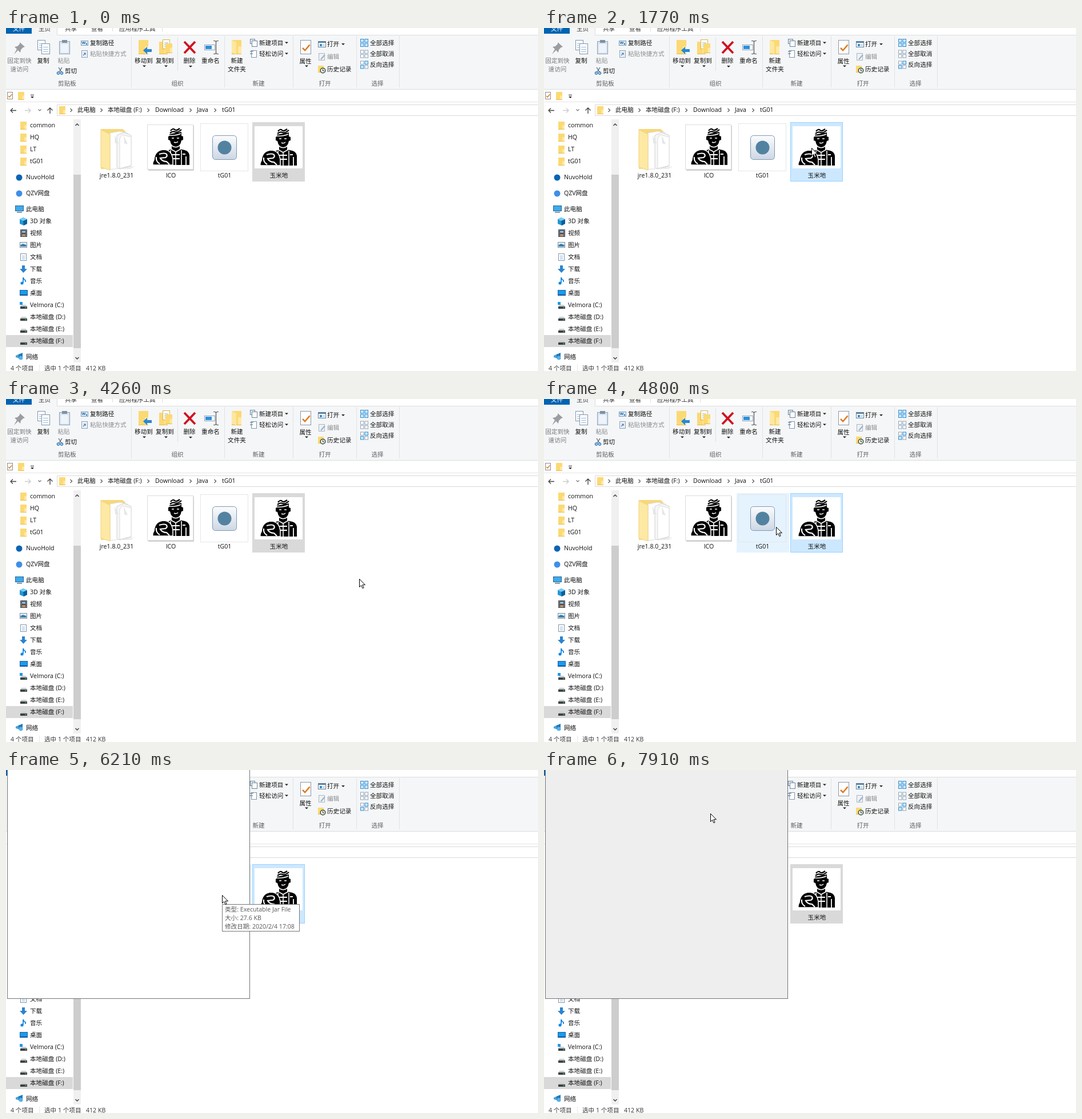
An HTML page that plays this animation: 931x601 px, repeating every 8000 ms.

```html
<!DOCTYPE html>
<html lang="zh">
<head>
<meta charset="utf-8">
<style>
html, body { margin: 0; width: 100%; height: 100%; overflow: hidden; background: #fff; }
svg { display: block; width: 100%; height: 100%; }
text { font: 10.6px "Open Sans", "Noto Sans CJK SC", "Noto Sans CJK", sans-serif; white-space: pre; }
</style>
</head>
<body>
<svg id="stage" viewBox="0 0 931 601" xmlns="http://www.w3.org/2000/svg"></svg>
<script>
const LOOP = 8000;
const GREY = '#8b8e92', LINE = '#dcddde', BLUE = '#0078d7', GOLD = '#fbd973';

// ---- shape helpers ----
const rect = (x, y, w, h, fill, more = '') =>
  `<rect x="${x}" y="${y}" width="${w}" height="${h}" fill="${fill}" ${more}/>`;
const box = (x, y, w, h, fill, edge, width = 1) =>
  rect(x + .5, y + .5, w - 1, h - 1, fill, `stroke="${edge}" stroke-width="${width}"`);
const path = (d, fill = 'none', edge = 'none', width = 1) =>
  `<path d="${d}" fill="${fill}" stroke="${edge}" stroke-width="${width}"/>`;
const dot = (x, y, r, fill, more = '') => `<circle cx="${x}" cy="${y}" r="${r}" fill="${fill}" ${more}/>`;
const text = (x, y, s, fill = '#111', more = '') =>
  `<text x="${x}" y="${y + 4}" fill="${fill}" ${more}>${s}</text>`;
const mid = (x, y, s, fill) => text(x, y, s, fill, 'text-anchor="middle"');
const group = (id, body, more = '') => `<g id="${id}" ${more}>${body}</g>`;
const at = (x, y, body) => `<g transform="translate(${x} ${y})">${body}</g>`;

// ---- small icons ----
const caret = (x, y) => path(`M${x - 3} ${y - 1.5}h6l-3 3z`, '#222');
const chevron = (x, y) => path(`M${x - 1.5} ${y - 3}l3 3l-3 3`, 'none', '#555', 1.2);
const folder = (x, y, w = 11, h = 14) =>
  rect(x, y, w, h, GOLD) + path(`M${x + w * .65} ${y + h}V${y + h * .45}H${x + w}V${y + h}z`, '#ffe9a6') +
  path(`M${x} ${y + h - .5}h${w}`, 'none', '#e8bd4c');
const page = (x, y, w, h, edge = '#8195ab') =>
  box(x, y, w, h, '#fff', edge) +
  [.35, .55, .75].map(k => path(`M${x + 3} ${y + h * k}h${w - 6}`, 'none', '#8db6dc')).join('');
const tick = (x, y, k) => path(`M${x} ${y}l${3 * k} ${3 * k}l${6 * k} ${-7 * k}`, 'none', '#e07a1f', 1.5 * k + .4);
const drive = (x, y) => path(`M${x + 2} ${y}h8l2 3h-12z`, '#c9cccf') + rect(x, y + 3, 12, 4, '#3d4145') +
  rect(x + 8, y + 4.5, 3, 1, '#56d364');
const grid = (x, y, fills) => fills.map((f, i) =>
  box(x + i % 2 * 7.5, y + (i >> 1) * 7.5, 6.5, 6.5, f ? '#cfe9fb' : '#fff', f ? '#2f8fd3' : '#8fa4b8')).join('');

const racer = path('M31 4q4-5 7-2t9-2M30 8q5-4 9-2t11-4', 'none', '#000', 2.3) +
  path('M29 10q10-2 21-4v7l3 1v6l-3 1q-2 11-10 11t-10-11l-3-1v-6l2-1z') .replace('"none"', '"#000"') +
  path('M29 12q11 1 20-3M33 17h4M42 17h4M37 24q4 2 7-1', 'none', '#fff', 1.5) +
  path('M33 31q7 5 14 0v5l9 2q7 2 8 9v17H20V47q1-7 8-9l5-2z', '#000') +
  path('M31 36l9 5l9-5M40 41v23M31 38v26M50 38v26', 'none', '#fff', 1.6) +
  path('M33 46h14M33 53h14M52 45h5M58 49v15', 'none', '#fff', 1.8) +
  path('M0 64q-1-4 2-9q1-16 16-18q15 0 17 17v10z', '#000', '#fff', 1.6) +
  path('M11 45q10-3 13 0q2 4-2 6l-9 1q3 6 11 6l5 5M6 50q-1 8 6 12', 'none', '#fff', 2.2);

// ---- window chrome ----
function ribbon() {
  let s = rect(0, 0, 931, 12, '#fff') + rect(0, 12, 931, 95, '#f5f6f7') + rect(45, 0, 44, 13, '#f5f6f7') +
    rect(0, 0, 45, 10, '#0063b1') + path('M89.5 0v12.5H931M186.5 0v6M273.5 0v6M0 107.5h931', 'none', LINE);
  [[12, '文件', '#fff'], [57, '主页'], [103, '共享'], [149, '查看'], [198, '应用程序工具']]
    .forEach(([x, t, c]) => s += text(x, .5, t, c || '#333'));
  [219, 382, 502, 613, 688].forEach(x => s += path(`M${x + .5} 14v90`, 'none', '#e1e2e4'));
  s += path('M300.5 17v58', 'none', '#e1e2e4');
  [[107, '剪贴板'], [300, '组织'], [442, '新建'], [558, '打开'], [650, '选择']]
    .forEach(([x, t]) => s += mid(x, 97, t, '#5c5f63'));
  [[23.5, 57, '固定到快', '#75787c'], [23.5, 72, '速访问', '#75787c'], [65, 57, '复制'], [101, 57, '粘贴', GREY],
    [241, 57, '移动到'], [278, 57, '复制到'], [321, 57, '删除'], [358, 57, '重命名'],
    [404, 57, '新建'], [404, 72, '文件夹'], [524, 58, '属性']].forEach(a => s += mid(...a));
  [[147, 25.5, '复制路径'], [147, 45, '粘贴快捷方式', GREY], [103, 75, '剪切'], [443, 25.5, '新建项目'],
    [443, 45, '轻松访问'], [562, 28, '打开'], [562, 50, '编辑', GREY], [562, 72, '历史记录'],
    [637, 25.5, '全部选择'], [637, 45, '全部取消'], [637, 64, '反向选择']].forEach(a => s += text(...a));
  [[242, 67], [280, 67], [323, 67.5], [526, 67], [491, 26], [491, 45], [590, 28.5]].forEach(a => s += caret(...a));

  s += path('M24 25l9 8l-3 1l-4 4l-1 5l-4-4l-7 7l5-9l-4-4l5-1l4-4z', '#9a9da1');
  s += page(55, 21, 14, 18) + page(62, 27, 15, 19);
  s += box(93, 23, 19, 23, '#d7e3ef', '#8ea2b7') + rect(98, 21, 9, 5, '#7f90a2') + rect(96, 28, 13, 15, '#eef4fa');
  s += box(131, 22, 13, 9, '#d9ecfa', '#7c9dbb') + path('M133 24l1.5 4l1.5-4l1.5 4l1.5-4', 'none', '#1c5e98') +
    rect(140, 27, 2, 2, '#1c5e98');
  s += box(132, 39, 11, 13, '#e9f0f7', '#8fa4ba') + path('M135 48l4-4m-3 0h3v3', 'none', '#4b7fb5', 1.2);
  s += path('M92 69l5 8M98 69l-5 8', 'none', '#56687b', 1.3) +
    [[91.5, 79], [97.5, 79]].map(([x, y]) => dot(x, y, 2, 'none', 'stroke="#2874b8" stroke-width="1.4"')).join('');
  s += folder(232, 21, 17, 25) + path('M240 39l7-6v4h8v5h-8v4z', '#2688d8');
  s += folder(268, 24, 15, 22) + page(274, 20, 13, 17, '#d9b24e') + folder(279, 27, 12, 17);
  s += path('M312 24l19 20M331 24l-19 20', 'none', '#cf1020', 3.8);
  s += box(347, 29, 19, 10, '#fff', '#8aa0b5') + rect(349, 31, 11, 6, '#2b8edb') +
    path('M363 22.5h3l1.5 1.5l1.5-1.5h3M363 45.5h3l1.5-1.5l1.5 1.5h3M367.5 24v20', 'none', '#555', 1.2);
  s += folder(395, 21, 17, 25) + path('M395 21l8 4v21l-8-3z', '#fde7a0');
  s += box(427, 19, 9, 9, '#dbeaf6', '#6f8699') + box(430, 22, 10, 11, '#fff', '#6f8699');
  s += box(429, 39, 10, 13, '#fff', '#8195ab') + path('M427 41h6M427 45h5', 'none', '#3c6f9c', 1.2);
  s += box(515, 21, 19, 25, '#fff', '#8b97a5') + tick(519, 35, 1.4);
  s += box(546, 23, 14, 11, '#fff', '#5f7f9c') + rect(547, 24, 12, 2, '#5f7f9c') + rect(549, 28, 4, 4, '#2f8fd3') +
    path('M554 29h4M554 31h4', 'none', '#9bb');
  s += box(547, 44, 11, 13, '#eef2f6', '#a9b6c3') + path('M551 55l7-8', 'none', '#9db1c5', 2);
  s += folder(546, 66, 10, 12) + dot(554.5, 74.5, 4.3, '#e6f0e4', 'stroke="#3d4a3f" stroke-width="1.4"') +
    path('M554.5 72v3h2.5', 'none', '#333');
  return s + grid(620, 19, [1, 1, 1, 1]) + grid(620, 38.5, [0, 0, 0, 0]) + grid(620, 57.5, [0, 1, 1, 0]);
}

function addressBar() {
  let s = path('M0 129.5h931', 'none', '#e4e5e6') + box(89, 134, 860, 20, '#fff', '#d9d9d9') +
    box(2, 112, 10, 13, '#fff', '#8b8b8b') + tick(4, 119, .7) + folder(21, 112) +
    path('M43 117.5h6', 'none', '#222') + caret(46, 121.5);
  s += path('M18 144.500H8m4-4l-4 4l4 4', 'none', '#444', 1.3) +
    path('M33 144.500h10m-4-4l4 4l-4 4', 'none', '#ccc', 1.3) +
    path('M56.500 142.500l2.500 2.500l2.500-2.500', 'none', '#777', 1.2) +
    path('M77 150v-10m-4.500 4.500l4.500-4.500l4.500 4.500', 'none', '#444', 1.4) + folder(93, 137);
  [114, 167, 249, 323, 366].forEach(x => s += chevron(x, 144));
  [[125, '此电脑'], [178, '本地磁盘 (F:)'], [261, 'Download'], [334, 'Java'], [378, 'tG01']]
    .forEach(([x, t]) => s += text(x, 143, t));
  return s;
}

function sidebar() {
  let s = rect(0, 538, 117, 21, '#d9d9d9') + rect(118, 160, 13, 426, '#f0f0f0') + rect(118, 257, 13, 304, '#cdcdcd') +
    path('M121.500 171l3-3l3 3M121.500 577l3 3l3-3', 'none', '#444', 1.5);
  ['common', 'HQ', 'LT', 'tG01'].forEach((t, i) => s += folder(25, 164 + 21 * i) + text(42, 170 + 21 * i, t));
  [[261, 'NuvoHold'], [289, 'QZV网盘'], [317, '此电脑'], [576, '网络']].forEach(([y, t]) => s += text(35, y, t));
  ['3D 对象', '视频', '图片', '文档', '下载', '音乐', '桌面', 'Velmora (C:)', '本地磁盘 (D:)', '本地磁盘 (E:)', '本地磁盘 (F:)']
    .forEach((t, i) => s += text(42, 338 + 21 * i, t));
  s += dot(23, 262, 5.5, '#0a64b4') + dot(23, 290, 5.5, '#3f8fe8');
  s += box(16, 311, 15, 10, '#3cabed', '#29648f') + rect(19, 322, 9, 1.500, '#56738a');
  s += path('M24 335l6-3l7 3v8l-6 3l-7-3z', '#2397d4') + path('M30 338l7-3v8l-6 3z', '#0d5f99') + path('M24 335l6-3l7 3l-7 3z', '#74cdf2');
  s += rect(25, 353, 12, 13, '#42474c') + rect(28, 355, 6, 4, '#8ab4d8') + rect(28, 361, 6, 4, '#b98f6b') +
    path('M26.500 354v11M35.500 354v11', 'none', '#ddd', 1).replace('/>', ' stroke-dasharray="1.500 1.500"/>');
  s += box(24, 375, 13, 10, '#e8f4fc', '#7c8a96') + path('M25.500 383v-3l4-2l6 2v3z', '#397fae');
  s += page(25, 395, 11, 13);
  s += path('M28 416h5v6h4l-6.500 7l-6.500-7h4z', '#2b84d1');
  s += path('M30 437v9.500M30 437q1 4 4 5v3', 'none', '#1689e0', 1.800) + dot(28, 447, 2.600, '#1689e0');
  s += box(24, 459, 14, 10, '#189bf0', '#1c5f9c') + rect(25, 467, 12, 1, '#0b4f86');
  [485, 506, 527, 548].forEach(y => s += drive(25, y));
  s += rect(24, 480, 5, 5, '#1d9be8');
  s += path('M17 574l7-3v8l-7-2z', '#46a5dd') + path('M22 572l7-3v9l-7 1z', '#2278b8') + dot(26, 578, 3.500, '#5bb0e5');
  return s + text(8, 596, '4 个项目', '#333') + path('M58.500 590v11', 'none', '#e8e8e8') +
    text(67, 596, '选中 1 个项目', '#333') + text(140, 596, '412 KB', '#333');
}

function files() {
  const folderBig = path('M166 177h38l5 4v63l-43 3z', '#f7d879') +
    path('M182 184l17-3l14 3v60l-31 4z', '#fff', '#ddd') + path('M194 188l12-5l13 5v54l-20 5l-5-3z', '#f6f6f6', '#d3d3d3') +
    path('M199 194l4-7l16 4v50l-20 5z', '#fff', '#ddd') + path('M190 188l7 14h-6zM206 188l7 16l-6-2z', '#e3e6e8') +
    path('M166 178l16 8v63l-16-5z', '#fde9a4', '#f0d27a') + path('M200 247l26-5l-8 5z', '#ececec');
  return folderBig + rect(249, 171, 80, 79, '#d0d0d0') + box(247, 169, 81, 79, '#fff', '#dcdcdc') + at(257, 176, racer) +
    group('hover', rect(337, 165, 92, 104, '#e5f3ff')) +
    rect(340.5, 167.500, 83, 83, 'none', 'stroke="#e2e6ea"') +
    rect(361.500, 188.500, 42, 42, 'url(#steel)', 'rx="5" stroke="#7f97b4"') + dot(382.500, 209.500, 12, '#5382a1') +
    rect(431.5, 165.5, 91, 103, '#d9d9d9', 'id="sel"') + rect(435, 172, 84, 74, '#fff') + at(445, 177, racer) +
    mid(193.500, 258, 'jre1.8.0_231') + mid(288.500, 258, 'ICO') + mid(382.500, 258, 'tG01') + mid(477.500, 258, '玉米地');
}

const dialog = box(405, 237, 382, 146, '#fff', '#6b6b6b') + rect(406, 337, 380, 45, '#f0f0f0') + text(409, 248, 'jox5n') +
  path('M768 244.500l9 9M777 244.500l-9 9', 'none', '#222', 1.200) +
  dot(441.800, 298.500, 13.300, BLUE) + rect(441, 295.500, 1.800, 10, '#fff') + dot(441.900, 292, 1.300, '#fff') +
  text(463, 298, 'This executable was created with an evaluation version of jox5n', '#111', 'style="font-size:9.8px"') +
  rect(693.5, 348.5, 75, 22, '#e1e1e1', 'id="ok"') + mid(731, 359.500, '确定');

const tip = box(378, 235, 136, 48, '#fff', '#767676') +
  ['类型: Executable Jar File', '大小: 27.6 KB', '修改日期: 2020/2/4 17:08']
    .map((t, i) => text(383, 244 + 15 * i, t, '#575757')).join('');

const arrow = path('M.5 .5V14.500L3.700 11.500L6 16.700L8.100 15.800L5.900 10.700H10.500Z', '#fff', '#000');

const stage = document.getElementById('stage');
stage.innerHTML = `<defs><linearGradient id="steel" x2="0" y2="1"><stop stop-color="#fbfcfd"/>
  <stop offset="1" stop-color="#ccd7e4"/></linearGradient></defs>` +
  rect(0, 0, 931, 601, '#fff') + ribbon() + addressBar() + sidebar() + files() +
  group('dialog', dialog) + rect(2.5, -2, 424, 402.500, '#fff', 'id="frame" stroke="#737373"') + group('tip', tip) +
  group('pointer', dot(0, 0, 10.500, '#ffff00', 'id="ring" fill-opacity=".47"') + arrow +
    dot(12, 1.500, 5.800, 'none', 'id="busy" stroke="#1b8fd6" stroke-width="2.600"'));

const el = Object.fromEntries([...stage.querySelectorAll('[id]')].map(n => [n.id, n]));
const set = (n, attrs) => { for (const k in attrs) n.setAttribute(k, attrs[k]); };
const show = (n, on) => set(n, { visibility: on ? 'visible' : 'hidden' });

// start, end, steps, from x y, to x y, power (negative eases out)
const moves = [
  [140, 900, 11, 814, 544, 461, 211, -2],
  [980, 1060, 2, 465, 211, 468, 210, 1],
  [3020, 3570, 8, 478, 214, 735, 352, -1.6],
  [3800, 4260, 7, 735, 352, 618, 315, 1.8],
  [4337, 4570, 4, 574, 298, 433, 242, 1],
  [4640, 4800, 3, 424, 237, 406, 224, 1],
  [4940, 5270, 6, 403, 223, 378, 219, -1.5],
  [6520, 6750, 4, 376, 218, 354, 210, 1],
  [6827, 7290, 7, 328, 192, 131, 63, -1.5],
  [7360, 7360, 1, 126, 66, 126, 66, 1],
  [7520, 7676, 3, 134, 62, 205, 57, 1],
  [7754, 7910, 3, 245, 62, 291, 76, -1.3]
];

function pointerAt(t) {
  const m = moves.filter(v => t >= v[0]).pop();
  if (!m) return null;
  const [t0, t1, n, x0, y0, x1, y1, e] = m;
  const k = t >= t1 ? 1 : Math.floor((t - t0) / (t1 - t0) * (n - 1) + .05) / (n - 1);
  const p = e > 0 ? k ** e : 1 - (1 - k) ** -e;
  return [x0 + (x1 - x0) * p, y0 + (y1 - y0) * p].map(Math.round);
}

function render(t) {
  const within = (a, b) => t >= a && t < b;
  const pos = pointerAt(t), [x, y] = pos || [-50, -50];
  const over = x >= 431 && x < 523 && y >= 165 && y < 269;
  const lit = over || within(4570, 6520);
  show(el.pointer, pos);
  set(el.pointer, { transform: `translate(${x} ${y})` });
  set(el.sel, { fill: lit ? '#cce8ff' : '#d9d9d9', stroke: lit ? '#99d1ff' : '#d9d9d9' });
  show(el.hover, within(4640, 6520));

  const pressed = within(3640, 3800);
  set(el.ring, { opacity: +(within(1380, 1530) || within(1600, 1770) || pressed) });
  set(el.busy, { opacity: +within(2230, 2470) });

  const aim = x >= 693 && x < 768 && y >= 348 && y < 371;
  show(el.dialog, within(2390, 3800));
  set(el.dialog, { opacity: t < 2470 ? .7 : 1 });
  set(el.ok, { fill: pressed ? '#cce4f7' : aim ? '#e5f1fb' : '#e1e1e1', stroke: pressed ? '#005499' : BLUE });

  show(el.tip, within(5730, 6520));
  set(el.tip, { opacity: Math.min(1, .36 + .22 * Math.floor((t - 5730) / 80)) });
  show(el.frame, t >= 6210);
  set(el.frame, { fill: t < 6380 ? '#fff' : '#eee' });
}

function loop() {
  render(performance.now() % LOOP);
  requestAnimationFrame(loop);
}
loop();
</script>
</body>
</html>
```
